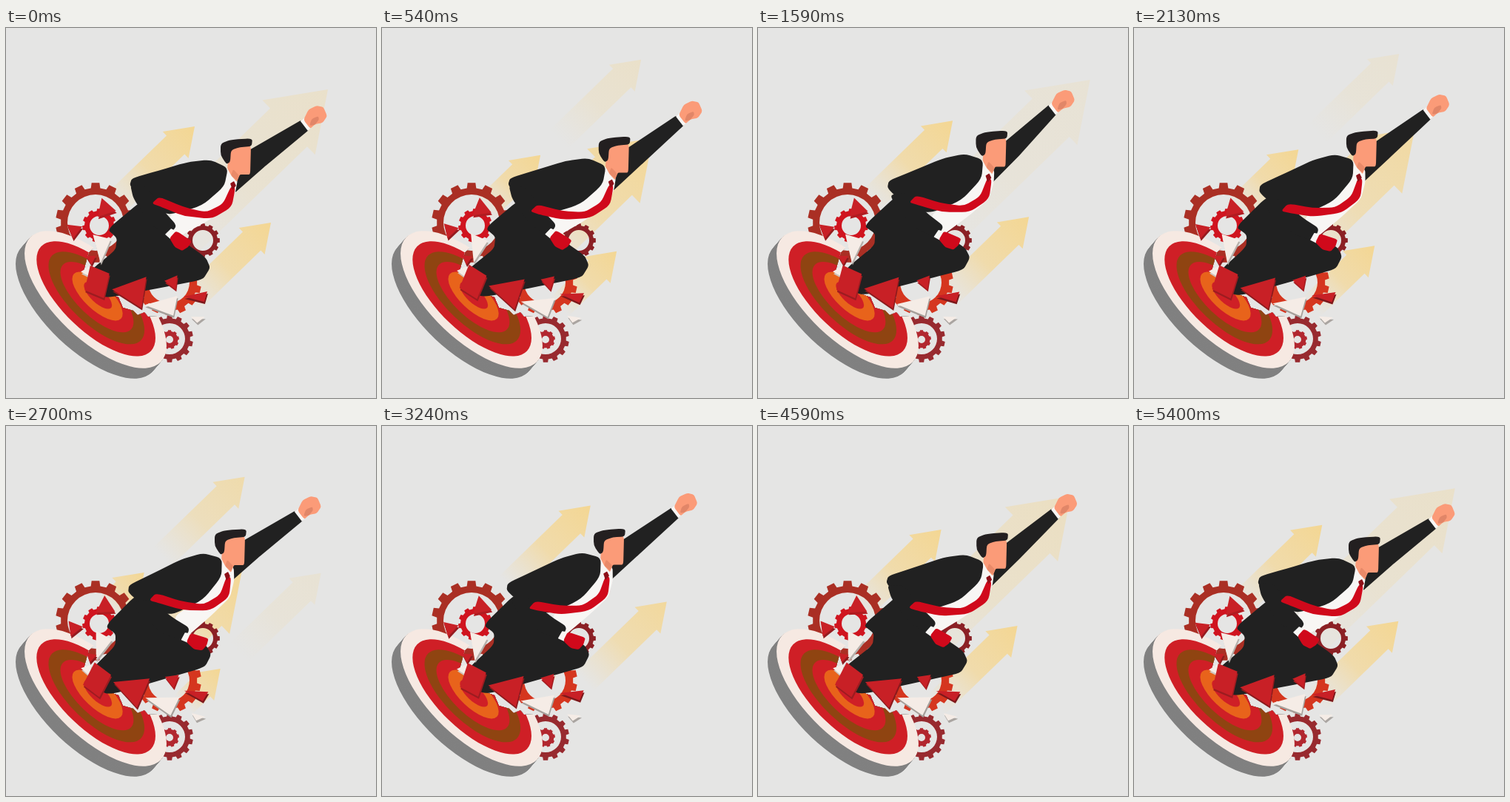
An HTML page with a canvas that plays this animation: 500 px wide and 500 px high, repeating every 5430 ms.

```html
<!DOCTYPE html>
<html lang="en">
<head>
<meta charset="utf-8">
<title>Breaking through the goal</title>
<style>
html, body { margin: 0; width: 100%; height: 100%; overflow: hidden; background: #e5e5e4; }
canvas { display: block; width: 100vw; height: 100vh; }
</style>
</head>
<body>
<canvas id="stage" width="500" height="500"></canvas>
<script>
const ctx = document.getElementById('stage').getContext('2d');
const LOOP = 5430, STEP = 30, CYCLE = 772, TAU = Math.PI * 2, DEG = Math.PI / 180;
const BACK = '#e5e5e4', DARK = '#212121', RED = '#c82026', SCARLET = '#d0091b';
const SKIN = '#fb9b78', WHITE = '#f8f6f4', CREAM = '#f5ece6';

const clamp = (v, a = 0, b = 1) => Math.min(b, Math.max(a, v));
const mix = (a, b, k) => a + (b - a) * k;
// 0 at the ends of the loop, 1 halfway, repeated n times
const swing = (t, n) => (1 - Math.cos(n * t / LOOP * TAU)) / 2;

function turn([x, y], a) {
  const c = Math.cos(a), s = Math.sin(a);
  return [x * c - y * s, x * s + y * c];
}

function pairs(flat) {
  const out = [];
  for (let i = 0; i < flat.length; i += 2) out.push([flat[i], flat[i + 1]]);
  return out;
}

// Closed outline through control points; k sets how far corners are rounded.
function outline(pts, k = 0) {
  const n = pts.length;
  const toward = (p, q) => [mix(p[0], q[0], k), mix(p[1], q[1], k)];
  ctx.beginPath();
  pts.forEach((p, i) => {
    ctx.lineTo(...toward(p, pts[(i + n - 1) % n]));
    ctx.quadraticCurveTo(...p, ...toward(p, pts[(i + 1) % n]));
  });
  ctx.closePath();
}

function fill(color, pts, k) {
  outline(pts, k);
  ctx.fillStyle = color;
  ctx.fill();
}

// ---- arrows ----
const flights = [
  { x: 255, y: 133, gap: 136, size: 1, from: 165, fade: 300, end: 375 },
  { x: 358, y: 263, gap: 136, size: 1, from: 268, fade: 378, end: 438 },
  { x: 435, y: 83, gap: 230, size: 2.05, from: 228, fade: 360, end: 470 }
];

function arrow(x, y, size, len, alpha) {
  const h = 36 * size, w = 25 * size, s = 17.5 * size;
  const g = ctx.createLinearGradient(0, 0, -len, 0);
  g.addColorStop(0, 'rgba(246,212,133,.85)');
  g.addColorStop(0.55, 'rgba(246,214,142,.66)');
  g.addColorStop(1, 'rgba(246,220,165,0)');
  ctx.save();
  ctx.translate(x, y);
  ctx.rotate(-0.77);
  ctx.globalAlpha = alpha;
  fill(g, pairs([0, 0, -h, -w, -h, -s, -len, -s, -len, s, -h, s, -h, w]));
  ctx.restore();
}

function drawArrows(t) {
  for (const f of flights) {
    for (let n = -1; n <= 1; n++) {
      const x = f.x + f.gap * (t / CYCLE % 1 + n), run = x - f.from;
      const alpha = clamp(run / 20) * clamp((f.end - x) / (f.end - f.fade));
      const len = clamp(run * 1.38 + 40, 40 * f.size, 155 * f.size);
      if (alpha > 0) arrow(x, f.y - 0.95 * (x - f.x), f.size, len, alpha);
    }
  }
}

// ---- gears ----
function gear(x, y, r, hole, teeth, color) {
  const pitch = TAU / teeth, root = r * 0.87;
  ctx.beginPath();
  for (let i = 0; i < teeth; i++) {
    for (const [d, rad] of [[-0.3, root], [-0.22, r], [0.22, r], [0.3, root]]) {
      const a = (i + d) * pitch - TAU / 4;
      ctx.lineTo(x + Math.cos(a) * rad, y + Math.sin(a) * rad);
    }
  }
  ctx.closePath();
  ctx.moveTo(x + hole, y);
  ctx.arc(x, y, hole, 0, TAU);
  ctx.fillStyle = color;
  ctx.fill('evenodd');
}

function drawGears() {
  gear(121, 263, 54, 38, 14, '#aa2f24');
  gear(126, 267, 23, 13, 11, '#d0141f');
  gear(220, 344, 44, 28, 14, '#d5361f');
  gear(266, 287, 23, 14, 12, '#8b2025');
  gear(221, 420, 32, 21, 14, '#982a2f');
  gear(221, 421, 13, 5, 9, '#b2272f');
}

// ---- dartboard ----
const crack = pairs([112, 303, 104, 331, 117, 335, 113, 350, 152, 364, 158, 378,
  172, 382, 178, 388, 187, 384, 192, 390, 245, 388, 245, 290, 160, 260]);
const rings = ['#f6e9e2', '#cf1f26', '#8f4411', '#cf1f26', '#e8631b', '#cf1f26'];

function disc(x, y, a, b, color) {
  ctx.beginPath();
  ctx.ellipse(x, y, a, b, 0.76, 0, TAU);
  ctx.fillStyle = color;
  ctx.fill();
}

function drawBoard() {
  ctx.save();
  outline(crack);
  ctx.rect(0, 0, 500, 500);
  ctx.clip('evenodd');
  for (let i = 14; i > 0; i--) disc(121 - i * 0.86, 367 + i, 122, 54, '#808080');
  rings.forEach((color, i) => {
    const k = 1 - 0.16 * i;
    disc(mix(125, 121, k), mix(360, 367, k), 122 * k, mix(47, 54, k) * k, color);
  });
  ctx.restore();
}

// ---- man ----
const neck = [297, 190], foot = [115, 345];
const joint = (pivot, deg, shift = [-8, -10]) => ({ pivot, angle: deg * DEG, shift });
const HEAD = joint(neck, 0), TORSO = joint(neck, -10), SHIRT = joint(neck, -12);
const FOREARM = joint(neck, -17), TIE = joint(neck, -5), LEGS = joint(foot, -5.4, [4, 0]);

// Each part turns about its joint; the body also drifts outward midway, the raised fist mostly upward.
function limb(t, color, k, flat, { pivot, angle, shift }) {
  const p = swing(t, 1), q = p * (1 - p);
  fill(color, pairs(flat).map(([x, y]) => {
    const [dx, dy] = turn([x - pivot[0], y - pivot[1]], angle * p);
    const w = clamp((x - 112) / 30), reach = clamp((x - 332) / 70);
    return [
      pivot[0] + dx + shift[0] * p + q * w * mix(41, -3, reach),
      pivot[1] + dy + shift[1] * p + q * w * mix(-18, -65, reach)
    ];
  }), k);
}

function drawMan(t) {
  const part = (...args) => limb(t, ...args);
  // raised arm
  part(DARK, 0.03, [308, 206, 327, 166, 398, 125, 409, 138, 350, 187, 310, 222], HEAD);
  part(WHITE, 0, [398, 126, 403, 122, 412, 134, 408, 139], HEAD);
  part(SKIN, 0.22, [402, 124, 409, 110, 420, 105, 429, 107, 434, 119, 428, 128, 418, 130, 411, 136], HEAD);
  part('#e18668', 0.3, [410, 132, 413, 123, 422, 119, 423, 124, 417, 131], HEAD);
  // legs
  part(DARK, 0.25, [185, 232, 137, 272, 150, 284, 148, 300, 116, 326, 113, 342, 130, 366,
    220, 349, 266, 340, 276, 324, 270, 310, 222, 276, 215, 250], LEGS);
  // shirt, jacket, forearm
  part(WHITE, 0.2, [296, 188, 313, 205, 310, 222, 300, 243, 270, 262, 232, 283,
    219, 276, 222, 252, 265, 236, 290, 212], SHIRT);
  part(DARK, 0.28, [167, 213, 170, 203, 205, 193, 246, 181, 276, 178, 300, 189,
    295, 214, 265, 240, 220, 253, 190, 240], TORSO);
  part(DARK, 0.25, [168, 212, 190, 214, 213, 247, 231, 267, 219, 282, 194, 264, 172, 230], FOREARM);
  part(WHITE, 0.05, [215, 279, 223, 271, 231, 275, 222, 285], FOREARM);
  part(SCARLET, 0.2, [221, 284, 230, 274, 251, 288, 246, 296, 238, 301, 228, 296], FOREARM);
  // tie, its tail fluttering
  const tie = [310, 216, 305, 242, 278, 258, 240, 254, 210, 242, 197, 237, 207, 228,
    240, 242, 270, 249, 293, 238, 304, 214];
  const lift = 14 * swing(t, 4);
  part(SCARLET, 0.28, tie.map((v, i) => i % 2 ? v + lift * clamp((285 - tie[i - 1]) / 80) : v), TIE);
  part('#8e1019', 0.1, [303, 210, 308, 207, 311, 213, 306, 219], HEAD);
  // head
  part(SKIN, 0.14, [302, 165, 316, 157, 331, 160, 330, 198, 316, 198, 312, 208, 304, 199, 299, 189], HEAD);
  part('#e98a69', 0.2, [307, 191, 315, 199, 312, 206, 304, 199], HEAD);
  part('#231f20', 0.32, [290, 172, 290, 156, 304, 151, 333, 149, 332, 160, 316, 161,
    304, 165, 303, 181, 298, 184], HEAD);
}

// ---- flying pieces ----
// x, y, radius, vertical stretch, angle in degrees, colours, corners
const shards = [
  [172, 356, 29, 0.85, 190, RED, '#8b1a1d'],
  [215, 375, 28, 0.55, 188, CREAM, '#a59f9a'],
  [260, 363, 20, 0.4, 188, RED, '#7d181b'],
  [225, 343, 11, 1, 190, RED, '#a51b1f'],
  [259, 393, 11, 0.5, 215, CREAM, '#aaa5a1'],
  [129, 294, 14, 1.7, 100, CREAM, '#b5afaa'],
  [134, 244, 15, 1, 255, RED, '#b01c21'],
  [92, 273, 12, 1, 220, RED, '#961b1f'],
  [110, 329, 9, 1, 180, CREAM, '#cfc4bd'],
  [115, 312, 8, 1, 210, RED, '#8b1a1d'],
  [123, 343, 19, 1.3, 65, RED, '#9c1c20', 4]
];

function drawShards(t) {
  const rock = (swing(t, 3) - 0.2) * 0.26;
  for (const [x, y, r, stretch, deg, face, side, n = 3] of shards) {
    const pts = Array.from({ length: n }, (_, i) => {
      const [px, py] = turn([r, 0], deg * DEG + i * TAU / n);
      const [dx, dy] = turn([px, py * stretch], rock);
      return [x + dx, y + dy];
    });
    fill(side, pts.map(([a, b]) => [a + 1, b + 3]));
    fill(face, pts);
  }
}

function draw(t) {
  ctx.fillStyle = BACK;
  ctx.fillRect(0, 0, 500, 500);
  drawArrows(t);
  drawGears();
  drawBoard();
  drawMan(t);
  drawShards(t);
}

const start = performance.now();
function frame() {
  const t = (performance.now() - start) % LOOP;
  draw(Math.floor(t / STEP) * STEP);
  requestAnimationFrame(frame);
}
draw(0);
requestAnimationFrame(frame);
</script>
</body>
</html>
```
